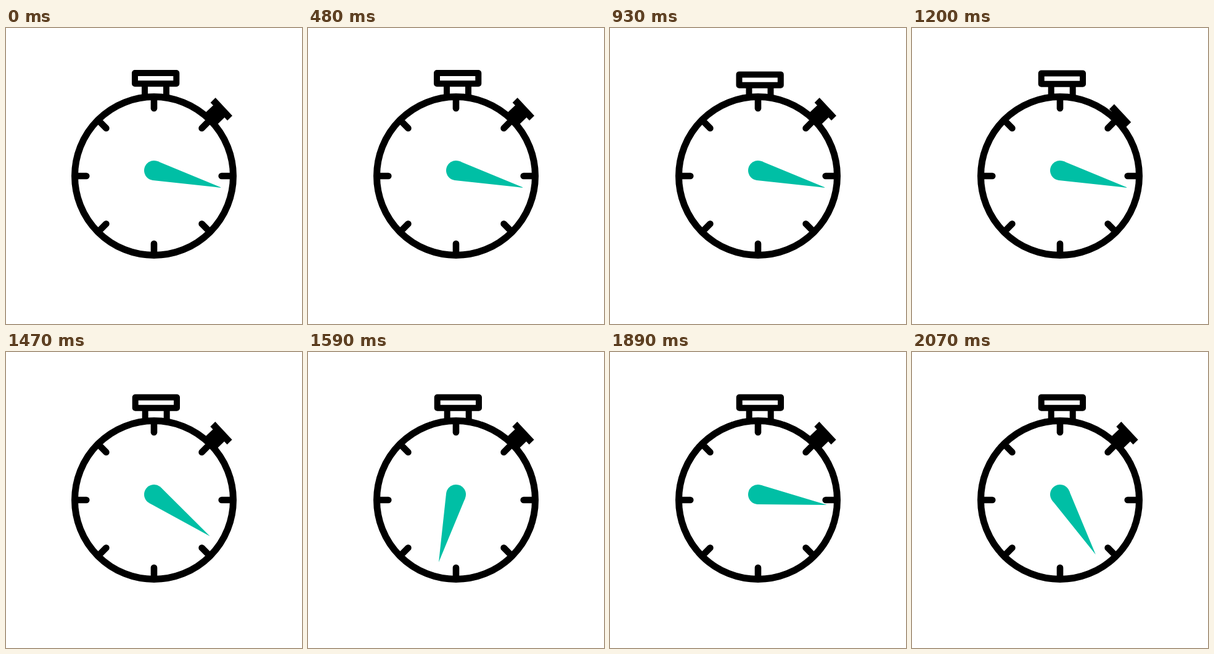
Animation, 480 px wide and 480 px high, one loop 2550 ms. Source, as an HTML page:

```html
<!DOCTYPE html>
<html lang="en">
<head>
<meta charset="utf-8">
<title>Stopwatch</title>
<style>
  html, body { margin: 0; width: 100%; height: 100%; overflow: hidden; background: #fff; }
  svg { display: block; width: 100%; height: 100%; }
</style>
</head>
<body>
<svg viewBox="0 0 480 480">
  <g id="crown" fill="none" stroke="#000" stroke-width="10">
    <path d="M225 90V120M260 90V120"/>
    <rect x="209" y="73" width="67.3" height="17.3" fill="#fff" stroke-linejoin="round"/>
  </g>
  <g id="side">
    <path d="M339.7 113L367 142.3L359 150L331.7 121Z"/>
    <path d="M337.5 124L356 143.5L340 159L320 140.5Z"/>
  </g>
  <circle cx="240" cy="240" r="128.5" fill="#fff" stroke="#000" stroke-width="11"/>
  <g id="ticks" stroke="#000" stroke-width="10.6" stroke-linecap="round"></g>
  <g id="hand" fill="#00bfa5">
    <circle r="16"/>
    <path d="M2.3 -15.84L113.3 0L2.3 15.84Z"/>
  </g>
</svg>
<script>
const LOOP = 2550, STEP = 30;
const [crown, side, ticks, hand] =
  ['crown', 'side', 'ticks', 'hand'].map(id => document.getElementById(id));

for (let a = 0; a < 360; a += 45)
  ticks.innerHTML += `<path d="M240 117V130.3" transform="rotate(${a} 240 240)"/>`;

const clamp = x => Math.min(1, Math.max(0, x));
const ease = x => x < 0.5 ? 2 * x * x : 1 - 2 * (1 - x) ** 2;
const ramp = (t, start, length) => ease(clamp((t - start) / length));
const move = (el, x, y) => el.setAttribute('transform', `translate(${x} ${y})`);

function draw(t) {
  const crownIn = ramp(t, 510, 240), crownOut = ramp(t, 750, 240);
  move(crown, -crownIn + 1.7 * crownOut, 15.5 * (crownIn - crownOut) + 0.5 * crownOut);

  const sideIn = ramp(t, 960, 240), sideOut = ramp(t, 1200, 240);
  move(side, -11.8 * sideIn + 11.4 * sideOut, 10.4 * (sideIn - sideOut));

  const angle = 14.3 + 405 * ramp(t, 1350, 720);
  hand.setAttribute('transform', `translate(240 231) rotate(${angle})`);
}

function tick() {
  const t = performance.now() % LOOP;
  draw(Math.floor(t / STEP) * STEP);
  requestAnimationFrame(tick);
}
tick();
</script>
</body>
</html>
```
